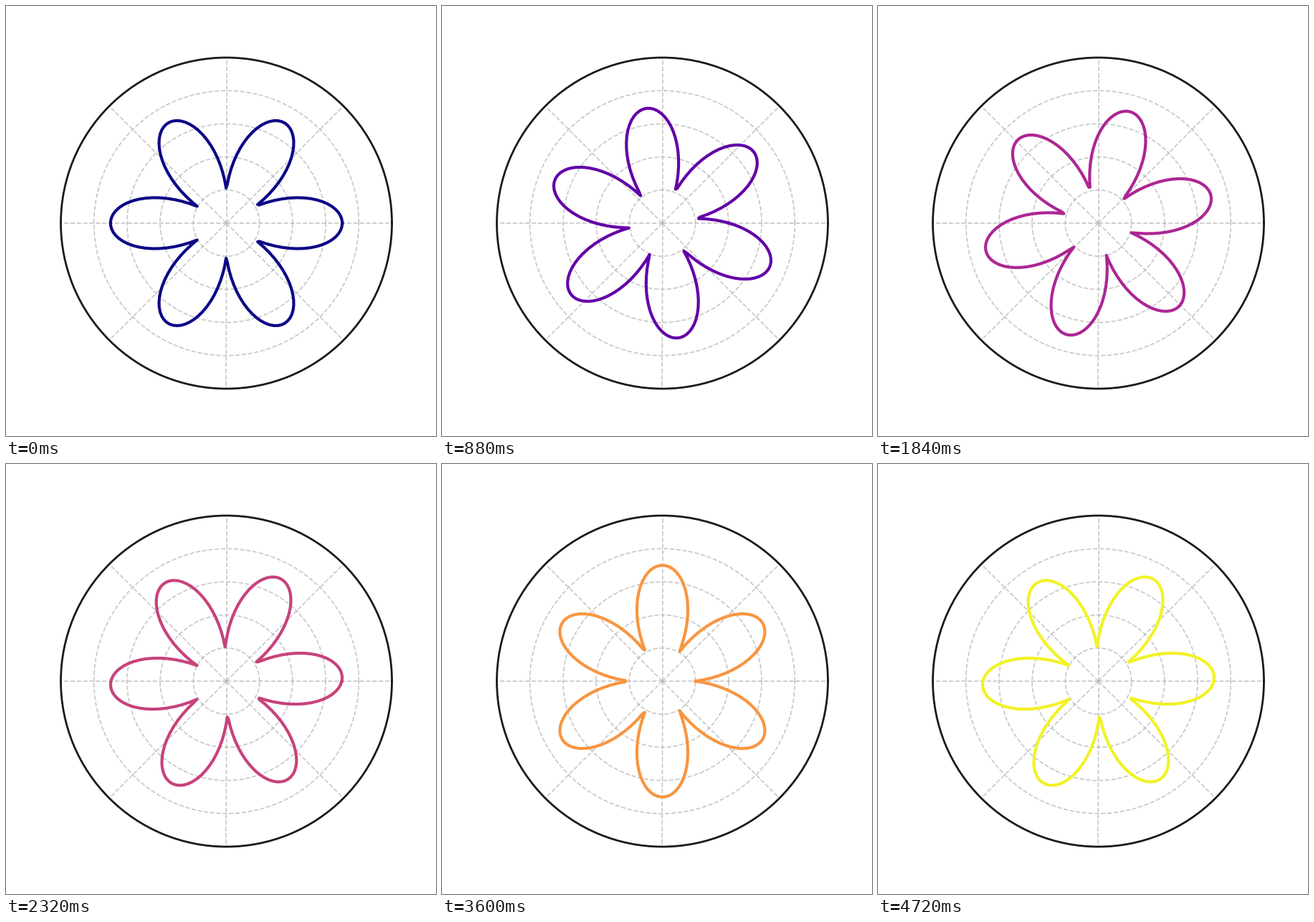
Recreate the animation shown at these times as a matplotlib script. Size 600 px wide and 600 px high, loop 4.8 s.

```python
import numpy as np
import matplotlib.pyplot as plt
from matplotlib.animation import FuncAnimation

FRAMES = 60
INTERVAL = 80

theta = np.linspace(0, 2 * np.pi, 200)


def rose(phase):
    """Radius of a six-petal rose turned by the given phase."""
    return 0.2 + 0.5 * np.abs(np.cos(3 * theta + phase))


fig = plt.figure(figsize=(6, 6), dpi=100, facecolor="white")
ax = fig.add_subplot(projection="polar")
ax.set_ylim(0, 1)
ax.set_yticks(np.linspace(0.2, 1, 5))
ax.set_xticks(np.arange(8) * np.pi / 4)
ax.set_xticklabels([])
ax.set_yticklabels([])
ax.grid(True, color="#b0b0b0", linestyle="--", linewidth=1.2, alpha=0.7)
ax.spines["polar"].set_linewidth(2)
ax.spines["polar"].set_color("#1a1a1a")

line, = ax.plot(theta, rose(0), linewidth=3)


def update(i):
    t = i / FRAMES
    line.set_ydata(rose(2 * np.pi * t))
    line.set_color(plt.cm.plasma(t))
    return line,


anim = FuncAnimation(fig, update, frames=FRAMES, interval=INTERVAL, repeat=True)
plt.show()
```
